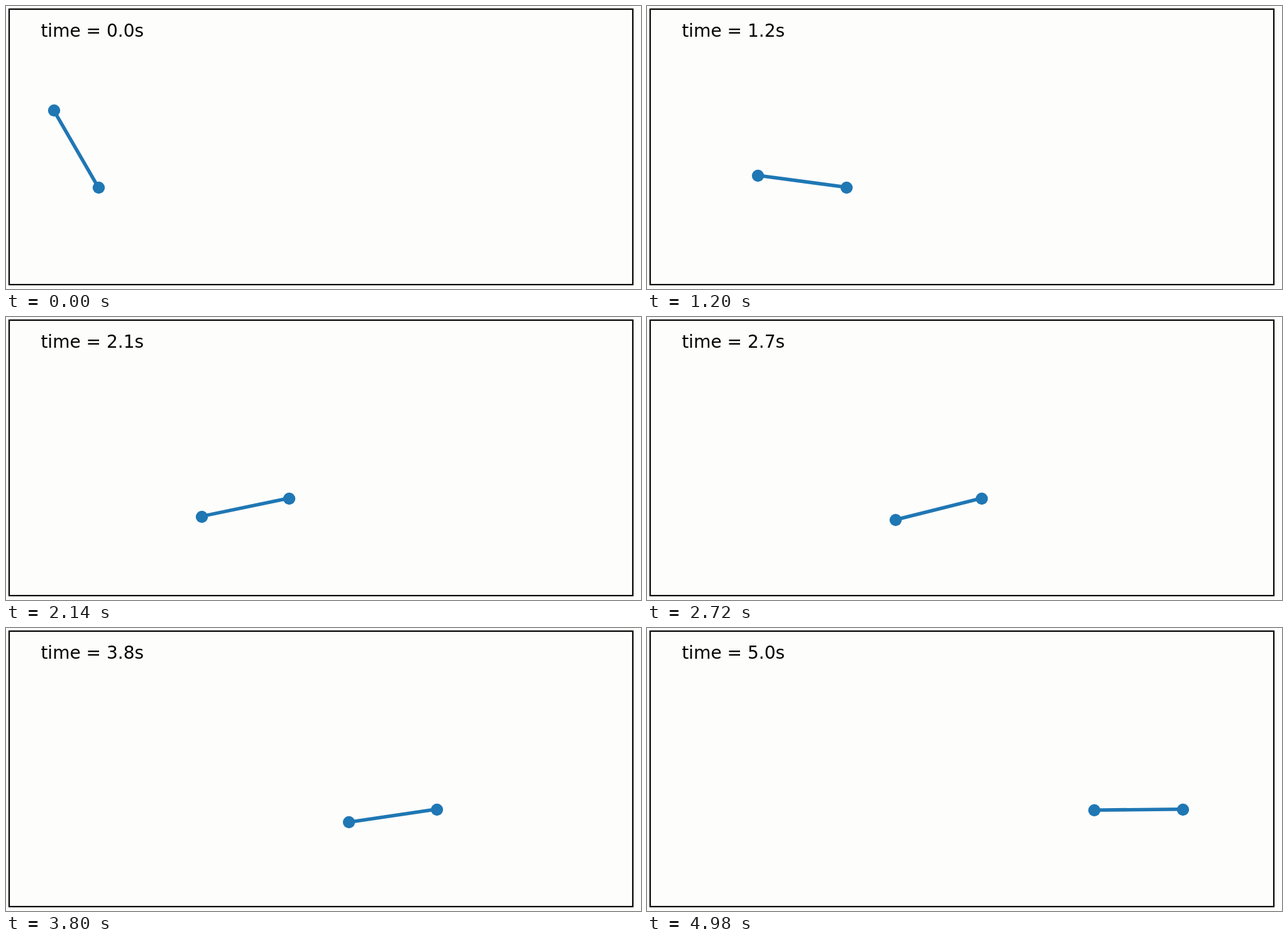
An HTML page that plays this animation: 1010 px wide and 451 px high, repeating every 5000 ms.

```html
<!DOCTYPE html>
<html lang="en">
<head>
<meta charset="utf-8">
<title>Towed rod</title>
<style>
  html, body { margin: 0; width: 100%; height: 100%; overflow: hidden; background: #fdfdfc; }
  svg { display: block; width: 100%; height: 100%; }
  text { font: 28px "DejaVu Sans", sans-serif; fill: #000; white-space: pre; }
</style>
</head>
<body>
<svg viewBox="0 0 1010 451">
  <rect width="1010" height="451" fill="#fdfdfc"/>
  <g fill="#1f77b4">
    <line id="rod" stroke="#1f77b4" stroke-width="5.6"/>
    <circle id="rear" r="9.7"/>
    <circle id="front" r="9.7"/>
  </g>
  <rect x="5" y="5" width="992" height="439" fill="none" stroke="#000" stroke-width="2.2"/>
  <text id="label" x="55.4" y="49"></text>
</svg>
<script>
const STEP = 0.02, COUNT = 250;
const UNIT = 141.71, X0 = 146.71, Y0 = 288.8;
const [rod, rear, front, label] =
  ["rod", "rear", "front", "label"].map(id => document.getElementById(id));

// Rod of unit length pulled at unit speed, with sideways drag on its free end.
const accel = (a, w) => -(w + Math.sin(a));

function solve() {
  const angles = [];
  let a = Math.PI / 3, w = -Math.sin(a);
  const h = STEP;
  for (let i = 0; i < COUNT; i++) {
    angles.push(a);
    const a1 = accel(a, w);
    const w2 = w + h / 2 * a1, a2 = accel(a + h / 2 * w, w2);
    const w3 = w + h / 2 * a2, a3 = accel(a + h / 2 * w2, w3);
    const w4 = w + h * a3, a4 = accel(a + h * w3, w4);
    a += h / 6 * (w + 2 * w2 + 2 * w3 + w4);
    w += h / 6 * (a1 + 2 * a2 + 2 * a3 + a4);
  }
  return angles;
}

const angles = solve();

function set(el, attrs) {
  for (const k in attrs) el.setAttribute(k, attrs[k]);
}

// Joints sit on pixel centres.
const snap = v => Math.round(v) + 0.5;
const place = (el, x, y) => set(el, { cx: snap(x), cy: snap(y) });

function draw(ms) {
  const i = Math.floor(ms / 1000 / STEP + 1e-6) % COUNT;
  const t = i * STEP;
  const x2 = X0 + UNIT * t, y2 = Y0;
  const x1 = x2 - UNIT * Math.cos(angles[i]);
  const y1 = y2 - UNIT * Math.sin(angles[i]);
  set(rod, { x1, y1, x2, y2 });
  place(rear, x1, y1);
  place(front, x2, y2);
  label.textContent = `time = ${t.toFixed(1)}s`;
}

const start = performance.now();
function tick(now) {
  draw(Math.max(0, now - start));
  requestAnimationFrame(tick);
}
draw(0);
requestAnimationFrame(tick);
</script>
</body>
</html>
```
